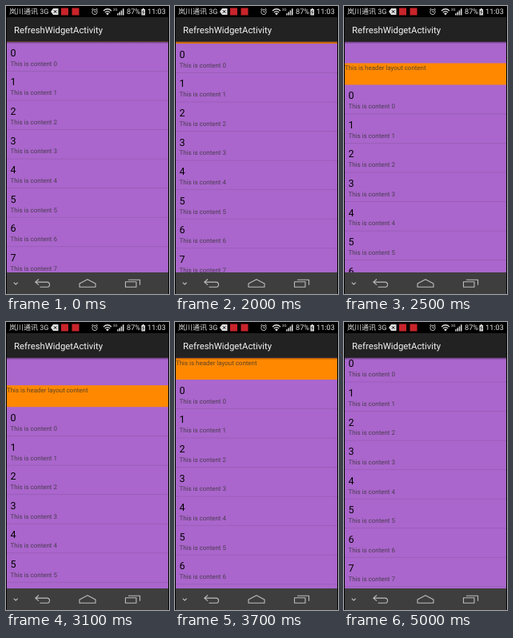
An HTML page that plays this animation: 204x360 px, repeating every 5100 ms.

```html
<!DOCTYPE html>
<html lang="en">
<head>
<meta charset="utf-8">
<title>Pull to refresh</title>
<style>
  html, body { margin: 0; width: 100%; height: 100%; overflow: hidden; background: #000; }
  svg { display: block; width: 100vw; height: 100vh; }
  text { font-family: Roboto, "Noto Sans CJK SC", "Noto Sans CJK", sans-serif; text-rendering: geometricPrecision; white-space: pre; }
  .status { font-size: 9.2px; fill: #e0e0e0; }
  .title { font-size: 11.34px; fill: #f3f3f3; }
  .large { font-size: 12.5px; fill: #000; }
  .small { font-size: 7.94px; fill: #323232; fill-opacity: .8; }
  .line { fill: none; stroke: #e0e0e0; }
  .nav { fill: none; stroke: #bdbdbd; stroke-width: 1.1; stroke-linejoin: round; }
</style>
</head>
<body>
<svg viewBox="0 0 204 360">
  <defs>
    <clipPath id="content"><rect x="1" y="44.5" width="202" height="288.5"/></clipPath>
    <linearGradient id="shadow" x2="0" y2="1">
      <stop stop-opacity=".42"/><stop offset="1" stop-opacity="0"/>
    </linearGradient>
  </defs>
  <rect width="204" height="360"/>

  <g clip-path="url(#content)">
    <rect x="1" y="44" width="202" height="289" fill="#a6c"/>
    <g id="list">
      <rect x="1" y="-27" width="202" height="27" fill="#f80"/>
      <text class="small" x="1" y="-18.1">This is header layout content</text>
    </g>
    <rect x="1" y="44.5" width="202" height="3" fill="url(#shadow)"/>
  </g>

  <rect x="1" y="14" width="202" height="30.5" fill="#222"/>
  <text class="title" x="10" y="33.7">RefreshWidgetActivity</text>

  <g id="status-bar">
    <text class="status" x="4" y="10.4" style="font-size:9px">岚川通讯 3G</text>
    <path d="M56 7l3-4h6.5v8H59z" fill="#e0e0e0"/>
    <path d="M60 5.3l3.2 3.4m0-3.4L60 8.7" stroke="#000"/>
    <rect x="69" y="2.5" width="9" height="9" fill="#c9242b"/>
    <rect x="82.5" y="2.5" width="9" height="9" fill="#c9242b"/>
    <g class="line" stroke-width=".8">
      <circle cx="111" cy="7.4" r="3.2"/>
      <path d="M111 5.4v2.2h1.6M107.2 4.6l2-1.7M114.8 4.6l-2-1.7"/>
      <path d="M122 6q5-4.5 10 0M123.8 8q3.2-2.8 6.4 0" stroke-width="1.3"/>
    </g>
    <path d="M125 9.2q2-1.4 4 0l-2 2.2z" fill="#e0e0e0"/>
    <path d="M139.9 11.4v-2.2m2.3 2.2V7.4m2.3 4V5.4m2.3 6V3.2" stroke="#e0e0e0" stroke-width="1.5"/>
    <text class="status" x="134" y="6.3" style="font-size:4.5px">3G</text>
    <text class="status" x="151" y="10.4">87%</text>
    <path d="M169.5 4h1.3V3h2v1h1.3v7.5h-4.6z" fill="#e0e0e0"/>
    <path d="M172.4 5l-1.6 2.7h2l-1.6 2.6" fill="none" stroke="#000" stroke-width=".7"/>
    <text class="status" x="177" y="10.4">11:03</text>
  </g>

  <rect x="1" y="333" width="202" height="27" fill="#3e3e3e"/>
  <g class="nav">
    <path d="M9.7 345.7l2.5 2.3 2.5-2.3"/>
    <path d="M41 341.5l-4.3 3.6 4.3 3.6M36.7 345.1h14.6q3.2 0 3.2 3.1t-3.2 3.1H42.5"/>
    <path d="M102 341.8l-10 5.2v4.3h20v-4.3z"/>
    <path d="M149.5 344.8h13.5v6.5h-13.5zM153 342.3h14.6v6.5"/>
  </g>
</svg>
<script>
const LOOP = 5100, STEP = 100, TOP = 45, ROW = 36.55, HEADER = 27;
const list = document.getElementById('list');

for (let i = 0; i < 9; i++) {
  const y = i * ROW;
  list.insertAdjacentHTML('beforeend', `
    <text class="large" x="5.5" y="${y + 17.9}">${i}</text>
    <text class="small" x="5.5" y="${y + 29.8}">This is content ${i}</text>
    <rect x="1" y="${y + ROW - 0.5}" width="202" height=".8" fill-opacity=".11"/>`);
}

const mix = (a, b, k) => a + (b - a) * k;
const progress = (t, start, end) => Math.min(1, Math.max(0, (t - start) / (end - start)));
const smooth = k => k * k * (3 - 2 * k);
const easeOut = k => 1 - (1 - k) ** 1.45;
const cubicInOut = k => k < 0.5 ? 4 * k ** 3 : 1 - 4 * (1 - k) ** 3;

// How far the list is pulled down: drag, settle on the header, swipe up.
function pull(t) {
  if (t < 2000) return 0;
  if (t < 3000) return mix(2, 71.5, smooth(progress(t, 2100, 2700)));
  if (t < 4500) return mix(71.5, HEADER, easeOut(progress(t, 3000, 3600)));
  return mix(HEADER, -6.5, cubicInOut(progress(t, 4540, 5000)));
}

function draw() {
  const t = Math.floor(performance.now() % LOOP / STEP) * STEP;
  list.setAttribute('transform', `translate(0 ${TOP + pull(t)})`);
  requestAnimationFrame(draw);
}
draw();
</script>
</body>
</html>
```
